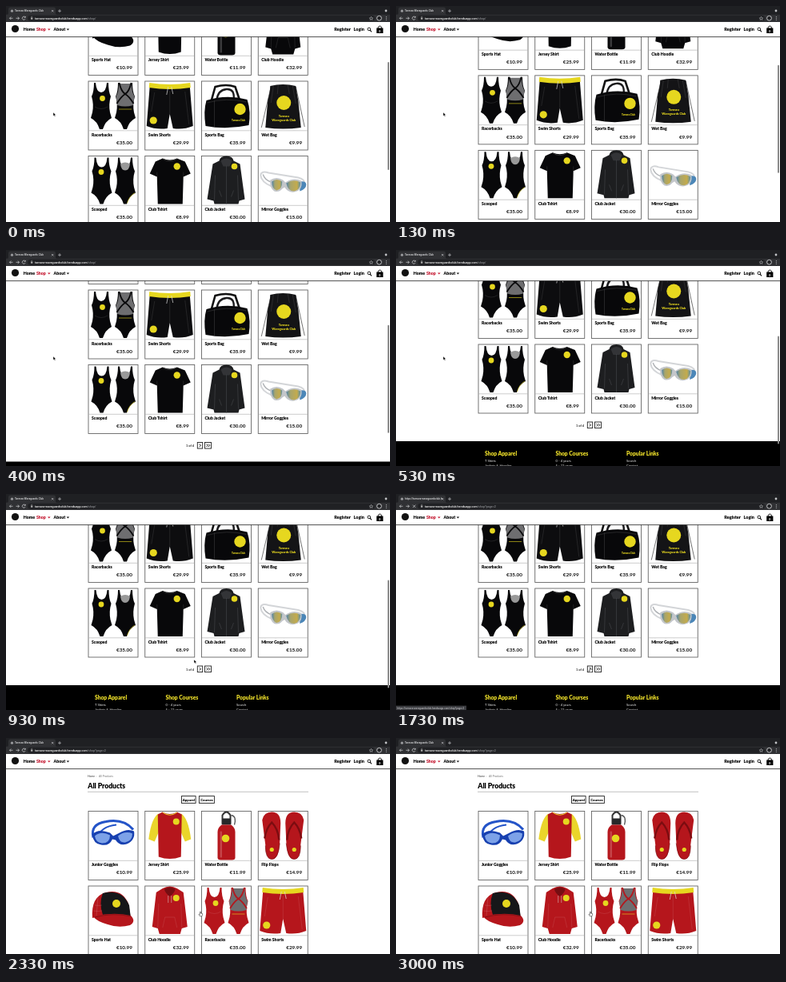
An HTML page that plays this animation: 480x270 px, repeating every 3.34 s.

```html
<!DOCTYPE html>
<html lang="en">
<head>
<meta charset="utf-8">
<title>Club shop</title>
<style>
html, body { margin: 0; width: 100%; height: 100%; overflow: hidden; background: #fff; }
svg { display: block; width: 100vw; height: 100vh; }
.h { font-family: Lato, sans-serif; font-weight: 900; letter-spacing: -.01em; }
.p { font-family: Lato, sans-serif; font-weight: 700; }
.t { font-family: Lato, sans-serif; }
.u { font-family: Roboto, sans-serif; font-weight: 500; }
</style>
</head>
<body>
<svg id="stage" viewBox="0 0 480 270"></svg>
<script>
const LOOP = 3340, STEP = 200 / 3;
const RED = '#b5161c', DARK = '#08080a', GOLD = '#e6d71f', GREY = '#6e6e70';
const SITE = 'tarnsea-waveguardsclub.herokuapp.com';
const CLUB = 'Tarnsea Waveguards Club';

const path = (d, fill, extra = '') => `<path d="${d}" fill="${fill}" ${extra}/>`;
const line = (d, stroke, w = 1, extra = '') =>
  `<path d="${d}" fill="none" stroke="${stroke}" stroke-width="${w}" ${extra}/>`;
const rect = (x, y, w, h, fill, extra = '') =>
  `<rect x="${x}" y="${y}" width="${w}" height="${h}" fill="${fill}" ${extra}/>`;
const dot = (x, y, r, fill = GOLD, extra = '') =>
  `<circle cx="${x}" cy="${y}" r="${r}" fill="${fill}" ${extra}/>`;
const text = (x, y, size, cls, s, fill = '#000', extra = '') =>
  `<text x="${x}" y="${y}" font-size="${size}" class="${cls}" fill="${fill}" ${extra}>${s}</text>`;
const group = (s, extra) => `<g ${extra}>${s}</g>`;
const move = (s, x, y) => group(s, `transform="translate(${x} ${y})"`);
const mirror = s => s + group(s, 'transform="translate(62 0) scale(-1 1)"');
const fold = d => line(d, '#fff', .6, 'opacity=".16"');

// Product pictures, each in a 62 x 62 box
const SUIT = 'M4 0H6Q7 12 13 12T20 0H22Q22 11 25 17Q22 27 24 37L26 44Q18 48 15 58H11Q8 48 0 44' +
  'L2 37Q4 27 1 17Q4 11 4 0Z';

function racer(c) {
  const back = path(SUIT, c) +
    path('M5 1H21Q21 12 24.5 17L22.8 28Q13 31 3.2 28L1.5 17Q5 12 5 1Z', GREY) +
    line('M5.5 0Q8 11 13 14T23.5 26M20.5 0Q18 11 13 14T2.5 26', c, 1.8) +
    line('M5 33H21', GOLD, .8, 'opacity=".75"');
  return move(path(SUIT, c) + fold('M5 30Q13 35 21 30'), 3, 2) + dot(17.5, 21.5, 3.4) + move(back, 33, 2);
}
function scooped(c) {
  const back = path(SUIT, c) + path('M7 8Q13 4 19 8Q18 16 13 16T7 8Z', '#999') + line('M25 44Q18 48 15.5 57', GOLD, .6);
  return move(path(SUIT, c), 3.5, 2) + dot(16, 20, 3.4) + move(back, 33, 2);
}
const shorts = c =>
  path('M6 6Q31 10 56 6L60 56Q48 61 35 59L31 41 28 59Q14 61 2 56Z', c) +
  path('M5.5 2Q31 6 56.5 2L57 8Q31 12 5 8Z', GOLD) +
  line('M29 7L27 17M33 7L35 16', '#ddd', .7) + fold('M31 12V41M50 13L55 54M12 14L8 38') + dot(10.5, 49, 4.6);
const sportsBag = () =>
  line('M12 25L17 7Q31 3 42 7L48 25', '#111', 2.6) + line('M19 24Q20 11 31 10T40 24', '#1b1b1d', 2.4) +
  path('M6 24Q31 16 57 23Q62 38 59 55Q31 61 5 56Q2 38 6 24Z', DARK) +
  line('M7 27Q31 20 56 26M16 24V57', '#3a3a3c', .6) + dot(48, 35, 7.2) +
  text(37.5, 50, 3, 'h', 'Tarnsea Club', GOLD);
const wetBag = () =>
  line('M16 7L4 58M47 7L58 57', '#555', .8) +
  path('M15 6Q31 2 47 6Q48 13 50 24L53.5 58Q31 61 9 58L12 24Q15 13 15 6Z', '#141416') +
  fold('M19 6L16 27M25 5L24 16M37 5L39 16M43 6L47 28') + dot(32, 27, 9) +
  text(32, 44.5, 3.9, 'h', 'Tarnsea', GOLD, 'text-anchor="middle"') +
  text(32, 49.6, 3.9, 'h', 'Waveguards Club', GOLD, 'text-anchor="middle"');
const tee = c =>
  path('M22 3Q31 7 40 3L50 7 57 22 48 26 47 60H16L15 26 6 22 13 7Z', c) +
  line('M22 3.5Q31 9 40 3.5', '#444', .7) + fold('M15 20V30M48 20V30') + dot(40, 13, 4.2);
const jersey = (c, sleeve) =>
  mirror(path('M17 3Q8 8 4.5 35L12 38 18 24Z', sleeve)) +
  path('M22 1Q31 6 40 1L46 4 45 57Q31 62 17 57L16 4Z', c) +
  line('M22 1.5Q31 8 40 1.5', sleeve, 1) + dot(39, 13, 4);
const hoodie = c =>
  path('M22 3Q31 -2 40 3L48 8 53 51 46 53 44 60H18L16 53 9 51 14 8Z', c) +
  path('M24 4Q31 -1 38 4Q36 10 31 13Q26 10 24 4Z', '#000', 'opacity=".35"') +
  line('M29 12V21M33 12V21', '#ddd', .5) + fold('M17 22L16 52M45 22L46 52M22 52L25 39H37L40 52') +
  dot(39, 15, 4);
const jacket = () =>
  path('M22 6Q23 0 31 0T40 6L48 10 54 54 47 56 46 60H16L15 56 7 54 14 10Z', '#1d1e20') +
  path('M24 6Q31 0 38 6L35 13H27Z', '#333437') +
  line('M31 12V60M17 24L16 55M45 24L46 55M22 43L25 51M40 43L37 51', '#46474a', .6) + dot(41, 13, 3.8);
const bottle = c =>
  line('M26 10V5Q31 -3 36 5V10', '#333', 2) + line('M37 5Q44 6 41 17', '#555', 1.3) +
  rect(25, 9, 12, 8, '#28282a', 'rx="1.5"') +
  path('M25 17H37Q42 21 42 26V58Q42 61 38 61H24Q20 61 20 58V26Q20 21 25 17Z', c) +
  rect(23, 25, 2.5, 33, '#fff', 'opacity=".2" rx="1"') + dot(30, 34, 4.8);
const flops = () => mirror(
  path('M5 11Q7 1 17 1Q28 1 28 15L27 37Q26 61 17 60Q9 60 9 42Z', RED) +
  line('M8 34Q10 21 17 14Q25 22 26 36', '#7c0c10', 2.4) + line('M9 43Q9 60 17 60T27 40', '#7c0c10', .7) +
  dot(17, 48, 2.6));
const hat = (side, front) =>
  path('M5 40Q3 13 22 8Q42 3 50 22L53 40Q28 33 5 40Z', side) +
  path('M18 9Q42 3 51 24L53 40Q36 34 18 36Q13 22 18 9Z', front) +
  line('M8 24Q15 25 17 24M6 31Q13 32 17 31M12 13L10 37', '#fff', .5, 'opacity=".25"') +
  path('M6 38Q31 32 53 37Q60 44 52 49Q38 53 24 48Q10 44 6 38Z', side) +
  line('M8 39Q31 33 53 38', '#000', .6, 'opacity=".4"') + dot(35, 22, 5);
const goggles = (strap, frame, lens) =>
  line('M6 33Q2 16 22 13Q44 9 56 23', strap, 3) + line('M10 35Q15 19 35 17', strap, 1.8) +
  path('M5 29Q12 21 27 27L31 31 39 27Q49 21 57 25Q59 36 48 41Q39 44 34 36L30 35Q26 44 16 42Q6 41 5 29Z', frame) +
  path('M8 31Q16 24 27 30Q27 40 17 40Q9 39 8 31Z', lens) +
  path('M37 31Q46 24 55 28Q55 37 46 39Q39 40 37 31Z', lens);
const racingGoggles = () =>
  line('M17 38Q4 33 3 24Q4 18 13 21L50 27Q59 29 58 36', '#d3d5d8', 2) + line('M6 23Q8 30 17 33', '#aeb1b5', 1.4) +
  path('M52 32Q60 31 60 36T52 44Z', '#4c87b8') +
  path('M15 30Q23 25 31 30L34 33Q44 26 54 31Q56 43 45 45Q37 46 33 39L30 41Q26 46 20 44Q14 40 15 30Z', '#c3c6ca') +
  path('M17 32Q23 27 30 32Q30 42 23 43Q17 41 17 32Z', 'url(#lens)') +
  path('M35 34Q44 28 53 33Q53 42 45 44Q37 44 35 34Z', 'url(#lens)');

function card(i, top, [name, price, art], clip) {
  const pic = group(art, clip ? `clip-path="url(#c${i})"` : '');
  return move(rect(0, 0, 62, 86, '#fff', 'stroke="#5c5c5c" stroke-width=".85"') + pic +
    line('M.5 61.8H61.5', '#aaa', .6) + text(4, 68.6, 5.1, 'h', name) +
    text(55, 78.8, 6.4, 'p', '€' + price, '#111', 'text-anchor="end"'),
    103 + 70.75 * (i % 4), top + 93.5 * (i >> 2));
}

const stock = [
  ['Sports Hat', '10.99', hat(DARK, '#151517')],
  ['Jersey Shirt', '25.99', jersey(DARK, DARK)],
  ['Water Bottle', '11.99', bottle(DARK)],
  ['Club Hoodie', '32.99', hoodie(DARK)],
  ['Racerbacks', '35.00', racer(DARK)],
  ['Swim Shorts', '29.99', shorts('#0d0d0f')],
  ['Sports Bag', '35.99', sportsBag()],
  ['Wet Bag', '9.99', wetBag()],
  ['Scooped', '35.00', scooped(DARK)],
  ['Club Tshirt', '8.99', tee(DARK)],
  ['Club Jacket', '30.00', jacket()],
  ['Mirror Goggles', '15.00', racingGoggles()]
];
const nextStock = [
  ['Junior Goggles', '10.99', goggles('#2454c8', '#1740b0', '#7da2e8')],
  ['Jersey Shirt', '25.99', jersey(RED, '#ead52b')],
  ['Water Bottle', '11.99', bottle(RED)],
  ['Flip Flops', '14.99', flops()],
  ['Sports Hat', '10.99', hat(RED, '#171719')],
  ['Club Hoodie', '32.99', hoodie(RED)],
  ['Racerbacks', '35.00', racer(RED)],
  ['Swim Shorts', '29.99', shorts(RED)]
];
// Height of each picture loaded at first paint
const firstRows = [15, 4, 4, 4, 11, 3, 5, 3];

const box = (x, y, w, h) => rect(x, y, w, h, '#fff', 'stroke="#222" stroke-width=".9"');

function footer() {
  const cols = [
    [111, 'Shop Apparel', 'T Shirts', 'Jackets &amp; Hoodies'],
    [199.5, 'Shop Courses', '0 - 4 years', '5 - 12 years'],
    [288, 'Popular Links', 'Search', 'Contact']
  ];
  return rect(0, 308.5, 480, 80, '#000') + cols.map(([x, head, a, b]) =>
    text(x, 326, 6.8, 'h', head, '#efe02a') + text(x, 334.6, 4.2, 't', a, '#eee') +
    text(x, 340.4, 4.2, 't', b, '#eee')).join('');
}

const listPage = stock.map((p, i) => card(i, .5, p)).join('') +
  text(225, 290, 4, 'p', '1 of 4', '#222') + box(239.3, 284.5, 6.4, 7.6) + box(248.5, 284.5, 8, 7.6) +
  line('M241.6 286.6L243.5 288.3 241.6 290M250.6 286.6L252.3 288.3 250.6 290M253 286.6L254.7 288.3 253 290', '#000', .9) +
  footer();

const nextPage = text(102, 49.4, 3.4, 't', 'Home', '#333') + text(112.6, 49.2, 3, 't', '›', '#777') +
  text(116, 49.4, 3.4, 't', 'All Products', '#777') + text(102.3, 63, 8.7, 'h', 'All Products') +
  line('M102 67.3H378', '#999', .6) +
  box(219.5, 72.6, 17.6, 8.8) + text(228.3, 78.6, 4.4, 'h', 'Apparel', '#000', 'text-anchor="middle"') +
  box(241.4, 72.6, 19, 8.8) + text(250.9, 78.6, 4.4, 'h', 'Courses', '#000', 'text-anchor="middle"') +
  nextStock.map((p, i) => card(i, 91.5, p, true)).join('');

const pale = '#d5d6d8';
const browser = rect(0, 0, 480, 11, '#1f2023') + path('M1 11Q3 11 3 9V4Q3 1.5 5 1.5H60Q62 1.5 62 4V9Q62 11 64 11Z', '#303134') +
  rect(0, 10.8, 480, 9.2, '#303134') + rect(27, 11.8, 434, 7, '#202124', 'rx="3.5"') +
  dot(7.5, 6.2, 1.6, '#9a9b9e') + dot(475, 6, 1.4, '#c4c5c8') +
  line('M57 5L59.4 7.4M59.4 5L57 7.4M65 6.2H69M67 4.2V8.2', pale, .6) +
  line('M8.5 15.3H4.5L6.3 13.5M4.5 15.3L6.3 17.1', pale, .7) +
  line('M12.5 15.3H16.5L14.7 13.5M16.5 15.3L14.7 17.1', pale, .7) +
  line('M24 14A2 2 0 1 0 24.2 16M24.3 12.8V14.3H22.8', pale, .7, 'id="reload"') +
  line('M21 13.6L24.4 17M24.4 13.6L21 17', pale, .7, 'id="stop"') +
  rect(31, 14.6, 2.4, 2.1, '#aaa') + line('M31.5 14.6V13.6Q32.2 12.6 32.9 13.6V14.6', '#aaa', .5) +
  line('M456.5 13.3L457.2 14.7 458.7 14.9 457.6 16 457.9 17.4 456.5 16.7 455.1 17.4 455.4 16 454.3 14.9 455.8 14.7Z', pale, .5) +
  dot(466.5, 15.2, 2.9, '#202124', `stroke="${pale}" stroke-width=".9"`) +
  [13.4, 15.3, 17.2].map(y => dot(475.3, y, .5, pale)).join('') +
  text(11, 7.4, 3.1, 'u', '', '#e4e5e7', 'id="tab"') +
  `<text x="36" y="16.7" font-size="3.6" class="u" fill="#fff">${SITE}<tspan id="route" fill="#8d8f93"></tspan></text>`;

const nav = rect(0, 20, 480, 18.6, '#fff') + line('M0 38.6H480', '#222', .8) + dot(11.5, 28.5, 4.6, '#111') +
  text(21.7, 31.4, 5.3, 'h', 'Home') + text(38, 31.4, 5.3, 'h', 'Shop', '#c3142d') + text(59.5, 31.4, 5.3, 'h', 'About') +
  path('M52 28.6H55.6L53.8 30.5Z', '#c3142d') + path('M75.6 28.6H79.2L77.4 30.5Z', '#111') +
  text(410.3, 31.4, 5.7, 'h', 'Register') + text(434.6, 31.4, 5.5, 'h', 'Login') +
  line('M455 30.2L457 32.3', '#000', 1.1) + dot(453.8, 28.9, 1.8, 'none', 'stroke="#000" stroke-width=".9"') +
  path('M463.2 27.5H471.4V34H463.2Z', '#000') + line('M465.2 28V26.3Q467.3 23.5 469.4 26.3V28', '#000', .9) +
  text(467.3, 32.6, 4.2, 'p', '0', '#fff', 'text-anchor="middle"');

const clips = firstRows.map((h, i) => `<clipPath id="c${i}"><rect width="62" height="0"/></clipPath>`).join('');
const status = rect(0, 264.6, 88, 5.4, '#3b3c40') + text(1.5, 268.6, 3, 'u', `https://${SITE}/shop?page=2`, '#b9babd');

document.getElementById('stage').innerHTML =
  `<defs>${clips}<linearGradient id="lens"><stop stop-color="#4f83a8"/><stop offset=".3" stop-color="#a9a56a"/>` +
  '<stop offset=".75" stop-color="#c4ab4c"/><stop offset="1" stop-color="#5a8fa8"/></linearGradient></defs>' +
  rect(0, 0, 480, 270, '#fff') + group(listPage, 'id="list"') + group(nextPage, 'id="next"') +
  rect(477, 0, 2, 135, '#8a8a8a', 'id="bar" rx="1"') + browser + nav + group(status, 'id="status"') +
  path('M0 0V4.6L1.1 3.6 1.9 5.3 2.7 4.9 2 3.3H3.4Z', '#000', 'id="arrow" stroke="#fff" stroke-width=".4"') +
  path('M-.6 0Q0 -.7 .6 0V1.8L2.6 2.3V4.2L2 5.4H-.7L-2 3.2 -1.5 2.7 -.6 3.4Z', '#fff', 'id="hand" stroke="#111" stroke-width=".5"');

const $ = id => document.getElementById(id);
const show = (id, on) => $(id).setAttribute('visibility', on ? 'visible' : 'hidden');
const place = (id, x, y) => $(id).setAttribute('transform', `translate(${x.toFixed(2)} ${y.toFixed(2)})`);
const rows = [...document.querySelectorAll('clipPath rect')];
const HOVER = 17, STATUS = 19, CLICK = 23, SWAP = 30, LOADED = 32;

function draw(ms) {
  const n = Math.floor((ms + 5) / STEP);
  const s = Math.min(n, 8), scroll = s * (1.148 + 1.296 * s - .0442 * s * s);
  const left = 1 - Math.min(Math.max((n - 8) / 8, 0), 1);
  const loading = n >= CLICK && n < SWAP, swapped = n >= SWAP;

  place('list', 0, -scroll);
  show('list', !swapped);
  show('next', swapped);
  rows.forEach((r, i) => r.setAttribute('height', n >= LOADED ? 62 : n > SWAP ? firstRows[i] : 0));

  $('bar').setAttribute('y', 70 + .54 * scroll);
  show('bar', n < 18);

  place('arrow', 242 - 183 * left ** 2.35, 217 - 84 * left ** 1.53);
  place('hand', 243, 217.3);
  show('arrow', n < HOVER);
  show('hand', n >= HOVER);

  show('status', n >= STATUS && n < LOADED);
  $('status').setAttribute('opacity', swapped ? .65 : 1);
  show('reload', !loading);
  show('stop', loading);
  $('tab').textContent = loading ? 'https://tarnsea-waveguardsclub.h' : CLUB;
  $('route').textContent = n < CLICK ? '/shop/' : '/shop?page=2';
}

const start = performance.now();
function tick() {
  draw((performance.now() - start) % LOOP);
  requestAnimationFrame(tick);
}
tick();
</script>
</body>
</html>
```
